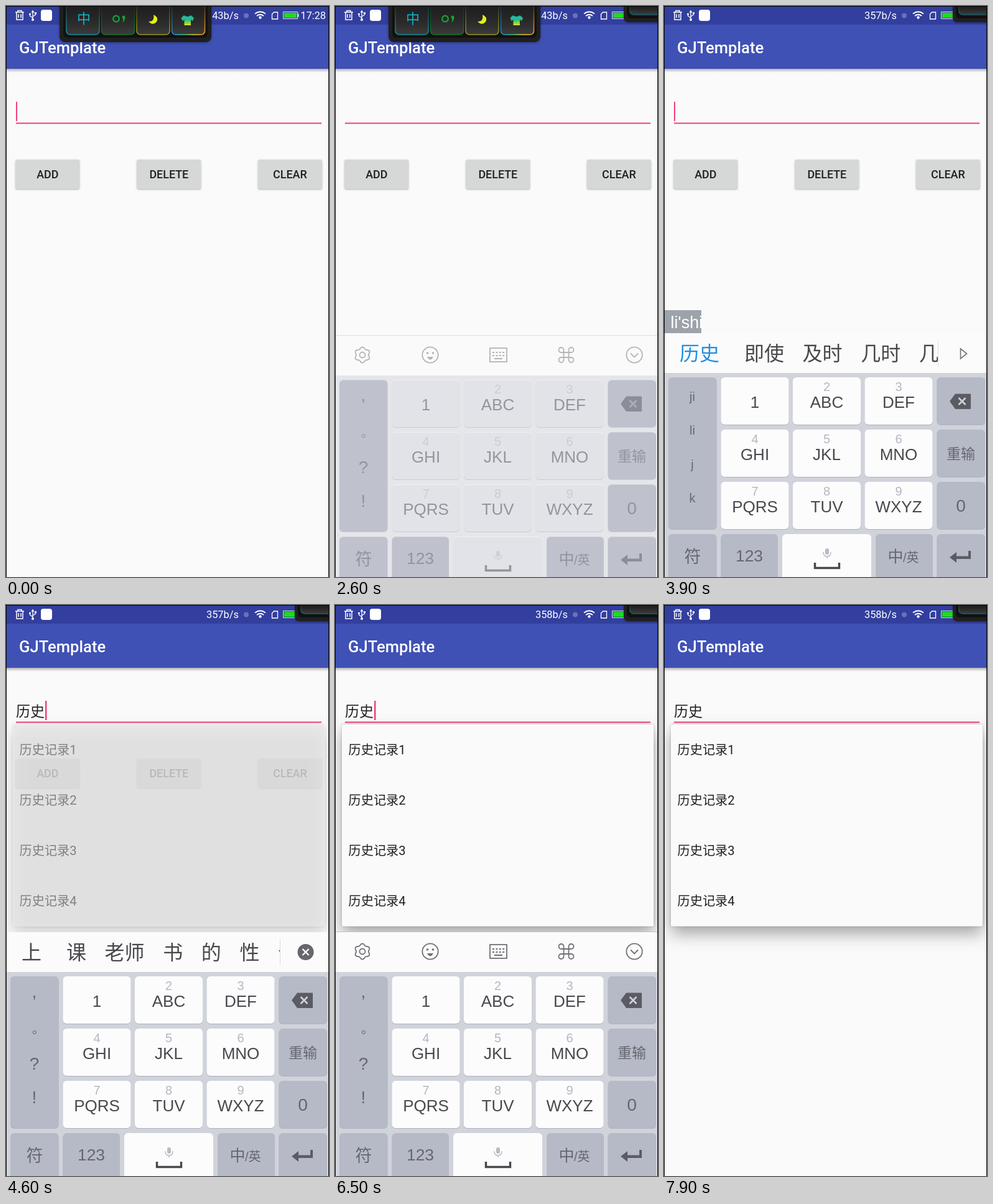
An HTML page with a canvas for the animation above (8 s loop, 519 px wide and 918 px high).

```html
<!DOCTYPE html>
<html lang="zh-CN">
<head>
<meta charset="utf-8">
<title>History input</title>
<style>
html, body { margin: 0; width: 100%; height: 100%; overflow: hidden; background: #fafafa; }
canvas { display: block; }
</style>
</head>
<body>
<canvas id="stage" width="519" height="918"></canvas>
<script>
const ctx = document.getElementById('stage').getContext('2d');
const LOOP = 8000;
const UI = 'Roboto, "Noto Sans CJK SC", sans-serif';
const KEY = '"Liberation Sans", "Noto Sans CJK SC", sans-serif';
const CJK = '"Noto Sans CJK SC", sans-serif';
const PINK = '#ee417c';

// Latest entry [time, value] not after t
const at = (steps, t) => steps.reduce((v, s) => t >= s[0] ? s[1] : v, steps[0][1]);

const cursorOn = [[0, 1], [1700, 0], [2100, 1], [2400, 0], [3500, 1], [4100, 0], [4400, 1],
  [5000, 0], [5700, 1], [5900, 0], [6500, 1], [6800, 0], [7100, 1], [7900, 0]];
const speeds = [[0, '343b/s'], [3500, '357b/s'], [6500, '358b/s']];
const boardPose = [[0, [0, 0]], [2600, [0.5, 4]], [2700, [1, 0]], [7200, [0.85, 2]], [7300, [0, 0]]];
const dropAlpha = [[0, 0], [4600, 0.5], [4700, 1]];
const composing = [[0, ''], [3300, 'j'], [3400, 'li'], [3600, "li's"], [3700, "li'sh"], [3800, "li'shi"], [4200, '']];
const marks = [',', '。', '?', '!'];
const sides = [[0, marks], [3200, ['j', 'k', 'l', '5']], [3400, ['ji', 'li', 'j', 'k']], [4400, marks]];
const words = [
  [0, null],
  [3200, '了 加 就 来 看 啦 家'],
  [3400, '里 几 及 级 力 机 立'],
  [3600, '历史 几 及时 即使 几'],
  [3800, '历史 即使 及时 几时 几'],
  [4400, '上 课 老师 书 的 性 个'],
  [6200, null]
];

function text(s, x, y, size, color, font = UI, align = 'left', weight = 400) {
  ctx.font = `${weight} ${size}px ${font}`;
  ctx.fillStyle = color;
  ctx.textAlign = align;
  ctx.fillText(s, x, y);
}

function rect(x, y, w, h, color) {
  ctx.fillStyle = color;
  ctx.fillRect(x, y, w, h);
}

function round(x, y, w, h, r, color) {
  ctx.beginPath();
  ctx.roundRect(x, y, w, h, r);
  ctx.fillStyle = color;
  ctx.fill();
}

function shape(d, x, y, color, width = 0) {
  const p = new Path2D(d);
  ctx.save();
  ctx.translate(x, y);
  if (width) {
    ctx.strokeStyle = color;
    ctx.lineWidth = width;
    ctx.stroke(p);
  } else {
    ctx.fillStyle = color;
    ctx.fill(p);
  }
  ctx.restore();
}

function disc(x, y, r, color, width = 0) {
  ctx.beginPath();
  ctx.arc(x, y, r, 0, Math.PI * 2);
  ctx.fillStyle = ctx.strokeStyle = color;
  ctx.lineWidth = width;
  width ? ctx.stroke() : ctx.fill();
}

function shadowed(color, blur, dy, draw) {
  ctx.save();
  ctx.shadowColor = color;
  ctx.shadowBlur = blur;
  ctx.shadowOffsetY = dy;
  draw();
  ctx.restore();
}

function ramp(x0, y0, x1, y1, ...colors) {
  const g = ctx.createLinearGradient(x0, y0, x1, y1);
  colors.forEach((c, i) => g.addColorStop(i / (colors.length - 1), c));
  return g;
}

function statusBar(t) {
  rect(0, 0, 519, 30, '#323f9e');
  shape('M-7 -5H7M-3 -5V-7.5H3V-5M-5 -5V7H5V-5M-2 -2V4M2 -2V4', 22, 15, '#fff', 1.5);
  shape('M0 -7V7M0 4L-4.5 1V-2M0 2L4.5 -1V-4', 43, 15, '#fff', 1.3);
  shape('M-2.5 -4.5L0 -8.5L2.5 -4.5Z', 43, 15, '#fff');
  disc(43, 22, 2, '#fff');
  disc(38.5, 13, 1.6, '#fff');
  rect(46, 10, 3, 3, '#fff');
  round(56, 6, 18, 18, 4, '#fff');
  text(at(speeds, t), 374, 21, 16.4, '#fff', UI, 'right');
  disc(386, 15.5, 4, '#6972b7');
  shape('M-8.5 -2.5Q0 -9 8.5 -2.5M-5.5 1Q0 -3.5 5.5 1', 408.5, 15, '#fff', 1.8);
  disc(408.5, 18.5, 2.2, '#fff');
  shape('M-4.5 5.5V-2.5L-1.5 -5.5H4.5V5.5Z', 432, 15.5, '#fff', 1.3);
  shape('M445.5 9.5H468.5V20.5H445.5Z', 0, 0, '#dfe2f5', 1);
  rect(447, 11, 20, 8, '#1edc1e');
  rect(469, 12.5, 1.5, 5, '#dfe2f5');
  text('17:28', 514, 21, 16.4, '#fff', UI, 'right');
}

function page(t) {
  rect(0, 0, 519, 918, '#fafafa');
  rect(0, 101, 519, 6, ramp(0, 101, 0, 107, 'rgba(0,0,0,.28)', 'rgba(0,0,0,0)'));
  rect(0, 30, 519, 71, '#3f51b5');
  text('GJTemplate', 21, 76, 25.6, '#fff', UI, 'left', 500);
  statusBar(t);

  rect(16, 187.5, 491, 2, PINK);
  const typed = t >= 4100;
  if (typed) text('历史', 16, 179, 23, '#212121', CJK);
  if (at(cursorOn, t)) rect(typed ? 63 : 16, 154, typed ? 2.5 : 2, 31, PINK);

  [['ADD', 15.5], ['DELETE', 210.5], ['CLEAR', 405]].forEach(([label, x]) => {
    shadowed('rgba(0,0,0,.3)', 3, 1, () => round(x, 247, 102.5, 47, 2.5, '#d6d7d7'));
    text(label, x + 51.3, 277, 17.9, '#202020', UI, 'center', 500);
  });
}

function darkKey(x, bottom, w, ...glow) {
  round(x, -8, w, bottom + 8, 6, ramp(0, 0, 0, bottom, '#252525', '#3a3a3a'));
  ctx.save();
  ctx.beginPath();
  ctx.rect(x - 2, 0, w + 4, bottom + 3);
  ctx.clip();
  ctx.beginPath();
  ctx.roundRect(x, -8, w, bottom + 8, 6);
  ctx.lineWidth = 1.6;
  ctx.strokeStyle = ramp(x, 0, x + w, 0, ...glow);
  ctx.stroke();
  rect(x - 2, 0, w + 4, bottom - 4, ramp(0, 0, 0, bottom - 4, 'rgba(30,30,30,.85)', 'rgba(30,30,30,0)'));
  ctx.restore();
}

function inputBar() {
  shadowed('rgba(0,0,0,.4)', 4, 1, () => round(86, -12, 244, 70, 9, '#1f1f1f'));
  round(92, -12, 232, 63, 7, '#111');
  darkKey(97, 46, 53, '#158a96', '#158a96');
  darkKey(153.5, 46, 53, '#156e2b', '#156e2b');
  darkKey(210, 46, 53, '#96951b', '#96951b');
  darkKey(266.5, 46, 53, '#1d8de0', '#29c28b', '#e0d526', '#f29a22');
  text('中', 125, 28, 22, '#10b4c4', CJK, 'center');
  disc(177, 20.5, 4.8, '#17a637', 2.2);
  disc(189, 18, 2.4, '#17a637');
  shape('M191.3 18Q191.5 24 187 26.5Q189 23 188 19Z', 0, 0, '#17a637');
  shape('M237 14Q246 18 242 25.5Q236 32 229 25Q239 25.5 237 14Z', 0, 0, '#e6ee18');
  shape('M286 15Q292 19 297 15L302 19L300 24L297 22V31H286.500V22L283.500 24L281.500 19Z', 0, 0,
    ramp(0, 14, 0, 31, '#14b9c4', '#2bbd78', '#e2e025'));
}

function cornerBar() {
  shadowed('rgba(0,0,0,.4)', 3, 1, () => round(464, -12, 70, 38, 7, '#202020'));
  round(469, -12, 66, 32, 6, '#111');
  darkKey(474, 14, 60, '#17606a', '#17606a');
}

function dropdown(alpha) {
  if (!alpha) return;
  ctx.save();
  ctx.globalAlpha = alpha;
  shadowed('rgba(0,0,0,.34)', 26, 12, () => round(11, 192, 501, 324.5, 2, '#fafafa'));
  shadowed('rgba(0,0,0,.25)', 3, 0, () => round(11, 192, 501, 324.5, 2, '#fafafa'));
  for (let i = 0; i < 4; i++) text('历史记录' + (i + 1), 21.5, 240 + 81 * i, 20.2, '#212121', UI);
  ctx.restore();
}

function toolIcons(pressed) {
  const c = '#707075', y = 557;
  if (pressed) rect(441, 527, 78, 63, '#e9e9ed');
  ctx.beginPath();
  for (let i = 0; i <= 72; i++) {
    const a = i / 72 * Math.PI * 2, r = 11.3 + 1.4 * Math.cos(a * 6);
    ctx.lineTo(44 + r * Math.sin(a), y + r * Math.cos(a));
  }
  ctx.strokeStyle = c;
  ctx.lineWidth = 1.8;
  ctx.stroke();
  disc(44, y, 4.5, c, 1.8);

  disc(153, y, 12.7, c, 1.8);
  disc(148.5, y - 3, 1.8, c);
  disc(157.5, y - 3, 1.8, c);
  shape('M-5 3Q0 12 5 3Z', 153, y, c);

  ctx.lineWidth = 1.8;
  ctx.strokeRect(249, y - 11, 27, 22);
  for (let i = 0; i < 8; i++) rect(253 + 5.4 * (i % 4), y - 5 + 5 * (i >> 2), 3, 2, c);
  rect(256, y + 5, 13, 2, c);

  shape('M-4 -4V-8A4 4 0 1 0 -8 -4H8A4 4 0 1 0 4 -8V8A4 4 0 1 0 8 4H-8A4 4 0 1 0 -4 8Z', 371.5, y, c, 1.8);
  disc(481, y, 12.7, c, 1.8);
  shape('M-6 -2.5L0 3.5L6 -2.5', 481, y, c, 1.8);
}

function candidates(line, done, pressed) {
  ctx.save();
  ctx.beginPath();
  ctx.rect(0, 526, 440, 64);
  ctx.clip();
  let x = 25;
  line.split(' ').forEach((word, i) => {
    text(word, x, 570, 32, !done && !i ? '#2390e2' : '#48484c', CJK);
    x += word.length * 32 + (i ? 29.6 : 40);
  });
  ctx.restore();
  rect(440, 537, 1, 42, '#dcdce0');
  if (pressed) rect(441, 527, 78, 63, '#e9e9ed');
  if (done) {
    disc(481.5, 558, 13, '#66666b');
    shape('M-5 -5L5 5M5 -5L-5 5', 481.5, 558, '#fff', 2.4);
  } else {
    shape('M476.500 551L486.500 559L476.500 567Z', 0, 0, '#77777c', 1.7);
  }
}

function softKey(x, y, w, h, white) {
  round(x, y + 1, w, h, 6, '#aeb2bf');
  round(x, y, w, h, 6, white ? '#fcfcfd' : '#b6bac7');
}

function keys(side) {
  const dark = '#48484d', mid = '#66676e', cols = [146, 261.5, 377];
  rect(0, 590, 519, 328, '#d1d3db');

  softKey(7, 597, 77.5, 244);
  side.forEach((s, i) => {
    const wide = s === '?' || s === '!';
    const y = [635, 689, 744, 798][i];
    text(s, s === '。' ? 52 : 45.5, s === ',' ? y - 4 : wide ? y + 3 : y, wide || s === ',' ? 28 : 20, mid, KEY, 'center');
  });

  ['1', 'ABC', 'DEF', 'GHI', 'JKL', 'MNO', 'PQRS', 'TUV', 'WXYZ'].forEach((label, i) => {
    const cx = cols[i % 3], y = 597 + 84 * Math.floor(i / 3);
    softKey(cx - 54.5, y, 109, 76, true);
    text(label, cx, y + 48.5, 26, dark, KEY, 'center');
    if (i) text(i + 1, cx, y + 21.5, 20, '#b5b7c1', KEY, 'center');
  });

  for (let i = 0; i < 4; i++) softKey(438.5, 597 + 84 * i, 77.5, 76);
  shape('M459 635.500L468 623.500H493V648H468Z', 0, 0, '#5b5c63');
  shape('M-5.500 -5.500L5.500 5.500M5.500 -5.500L-5.500 5.500', 479, 635.5, '#cfd1d9', 2.6);
  text('重输', 477, 728, 23, mid, CJK, 'center');
  text('0', 477, 813, 28, mid, KEY, 'center');
  shape('M459 886.500L470 878V884.500H489V876H493V889H470V895Z', 0, 0, '#5b5c63');

  softKey(7, 849, 77.5, 76);
  softKey(91.5, 849, 91.5, 76);
  softKey(190, 849, 143, 76, true);
  softKey(340, 849, 92, 76);
  text('符', 46, 895, 27, mid, CJK, 'center');
  text('123', 137, 893, 26.5, mid, KEY, 'center');
  round(259, 872, 6, 10, 3, '#b9bbc4');
  shape('M256 878Q256 885 262 885Q268 885 268 878M262 885V888', 0, 0, '#b9bbc4', 1.5);
  shape('M242.500 895V903.500H281.500V895', 0, 0, dark, 3.4);
  text('中', 359.5, 894, 25, mid, CJK);
  text('/英', 384, 894, 20, mid, KEY);
}

function keyboard(t) {
  const [alpha, dy] = at(boardPose, t);
  if (!alpha) return;
  ctx.save();
  ctx.globalAlpha = alpha;
  ctx.translate(0, dy);
  rect(0, 526, 519, 64, '#fbfbfc');
  const line = at(words, t);
  if (line) {
    candidates(line, t >= 4400, t >= 6100);
  } else {
    rect(0, 525, 519, 1, '#c4c5c9');
    toolIcons(t >= 7100);
  }
  keys(at(sides, t));
  ctx.restore();
}

function pinyin(s) {
  if (!s) return;
  ctx.save();
  ctx.font = `27px ${KEY}`;
  const w = ctx.measureText(s).width + 7.4;
  ctx.beginPath();
  ctx.rect(1, 489, w, 37);
  ctx.clip();
  rect(1, 489, w, 37, '#9da3ab');
  text(s, 10.5, 518, 27, '#fff', KEY);
  ctx.restore();
}

function draw(t) {
  page(t);
  if (t < 3500) inputBar();
  if (t >= 1100) cornerBar();
  dropdown(at(dropAlpha, t));
  keyboard(t);
  pinyin(at(composing, t));
  rect(0, 0, 1, 918, '#000');
  rect(518, 0, 1, 918, '#000');
  rect(0, 0, 519, 1, '#000');
}

function tick() {
  draw(performance.now() % LOOP);
  requestAnimationFrame(tick);
}
tick();
</script>
</body>
</html>
```
